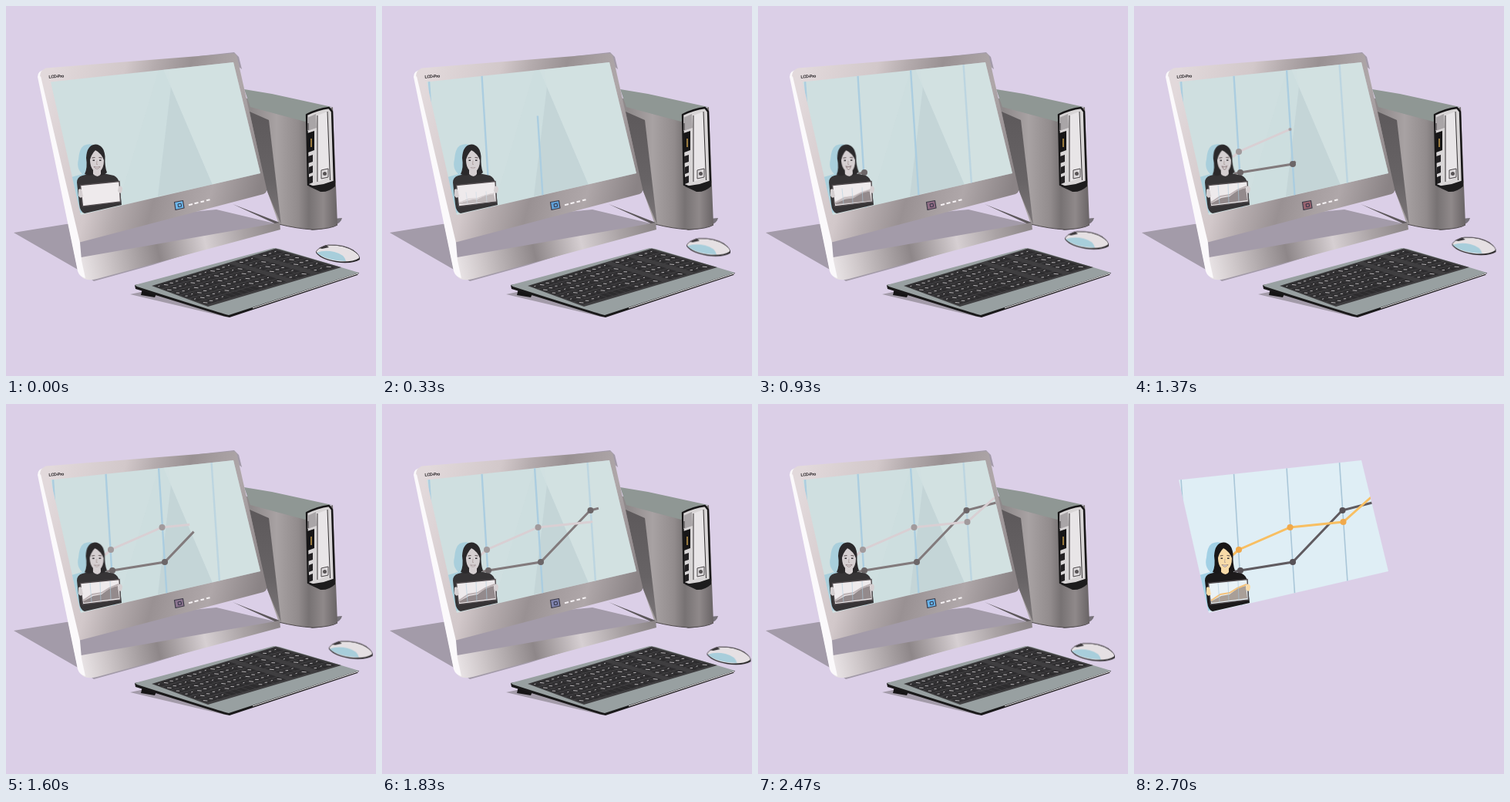
Animation of 480x480 px, one loop 2730 ms. Source, as an HTML page:

```html
<!DOCTYPE html>
<html lang="en">
<head>
<meta charset="utf-8">
<title>Presentation on a desktop computer</title>
<style>
html, body { margin: 0; width: 100%; height: 100%; overflow: hidden; background: #dbcfe7; }
svg { display: block; width: 100%; height: 100%; }
svg * { animation-duration: 2730ms; animation-timing-function: linear; animation-iteration-count: infinite; }

/* The last 30 ms show only the screen, in full colour. */
#scene { animation-name: palette; animation-timing-function: step-end; }
@keyframes palette {
  0% { --screen: #cfdfe0; --grid: #abcde0; --gridW: 2.4; --far: .55; --warm: #d9cfd3; --warmDot: #a19a9c;
       --cool: #827a7c; --coolDot: #6c6668; --skin: #d5cfd1; --hair: #2b292b; --suit: #363436; --back: #a9cfdc;
       --paper: #eeeaec; --area: #938a8c; --crest: #bdb3b5; }
  98.9%, 100% { --screen: #dfeef5; --grid: #a9c6d8; --gridW: 1.6; --far: 1; --warm: #f8bf62; --warmDot: #f0a94b;
       --cool: #605b60; --coolDot: #575257; --skin: #f8dba8; --hair: #191718; --suit: #1c1a1b; --back: #a2d0e5;
       --paper: #e9f2f6; --area: #a99f98; --crest: #f5c27a; }
}
.gear { animation-name: vanish; animation-timing-function: step-end; }
@keyframes vanish { 0% { visibility: visible; } 98.9%, 100% { visibility: hidden; } }

.draw { fill: none; stroke-dasharray: 1 2; }
.grid { stroke: var(--grid); stroke-width: var(--gridW); }
.cool { stroke: var(--cool); stroke-width: 3; animation-name: cool; }
.warm { stroke: var(--warm); stroke-width: 3; animation-name: warm; }
@keyframes cool { 0%, 33% { stroke-dashoffset: 1; } 34% { stroke-dashoffset: .96; } 49.5% { stroke-dashoffset: .63; }
  67% { stroke-dashoffset: .14; } 72%, 100% { stroke-dashoffset: 0; } }
@keyframes warm { 0%, 34.5% { stroke-dashoffset: 1; } 50.2% { stroke-dashoffset: .585; }
  67% { stroke-dashoffset: .235; } 78%, 100% { stroke-dashoffset: 0; } }
#g1 { animation-name: g1; } #g2 { animation-name: g2; } #g3 { animation-name: g3; }
#g4 { animation-name: g4; opacity: var(--far); }
@keyframes g1 { 0% { stroke-dashoffset: 1; } 3.7%, 100% { stroke-dashoffset: 0; } }
@keyframes g2 { 0%, 3% { stroke-dashoffset: 1; } 9.2%, 100% { stroke-dashoffset: 0; } }
@keyframes g3 { 0%, 8.4% { stroke-dashoffset: 1; } 14.3%, 100% { stroke-dashoffset: 0; } }
@keyframes g4 { 0%, 14.3% { stroke-dashoffset: 1; } 20.1%, 100% { stroke-dashoffset: 0; } }

.dot { transform-box: fill-box; transform-origin: center; }
.coolDot { fill: var(--coolDot); } .warmDot { fill: var(--warmDot); }
#c1 { animation-name: c1; } #c2 { animation-name: c2; } #c3 { animation-name: c3; }
#w1 { animation-name: w1; } #w2 { animation-name: w2; } #w3 { animation-name: w3; }
@keyframes c1 { 0%, 31.5% { transform: scale(0); } 34%, 100% { transform: none; } }
@keyframes c2 { 0%, 47% { transform: scale(0); } 50%, 100% { transform: none; } }
@keyframes c3 { 0%, 63% { transform: scale(0); } 66%, 100% { transform: none; } }
@keyframes w1 { 0%, 34.5% { transform: scale(0); } 37.5%, 100% { transform: none; } }
@keyframes w2 { 0%, 48.5% { transform: scale(0); } 52%, 100% { transform: none; } }
@keyframes w3 { 0%, 67.2% { transform: scale(0); } 70.5%, 100% { transform: none; } }

#mouse { animation-name: glide; }
@keyframes glide {
  0%, 100% { transform: none; }
  6% { transform: translate(-4px, -4px); }
  12.1% { transform: translate(-7px, -8.5px); }
  20% { transform: translate(-8.5px, -14px); }
  27% { transform: translate(-7.5px, -17px); }
  34.1% { transform: translate(-4px, -17.5px); }
  42% { transform: translate(3px, -15.5px); }
  50.2% { transform: translate(10.5px, -10px); }
  59% { transform: translate(17px, -2px); }
  67% { transform: translate(19.5px, 5px); }
  74% { transform: translate(17px, 6px); }
  82% { transform: translate(10px, 3.5px); }
  90.5% { transform: translate(4px, .5px); }
}
#power { animation-name: power; }
@keyframes power { 0%, 100% { fill: #6db7ea; } 12% { fill: #609fd6; } 34% { fill: #8f6c84; }
  50% { fill: #99646f; } 67% { fill: #7f83ad; } 90% { fill: #65b2e9; } }

#head { transform-origin: 118px 220px; animation-name: nod; }
@keyframes nod { 0%, 14%, 64%, 100% { transform: none; } 34%, 50% { transform: rotate(-3deg); } }
#mouth { transform-origin: 118px 210px; animation-name: talk; }
@keyframes talk { 0%, 24%, 44%, 62%, 80%, 100% { transform: none; } 12%, 56%, 72% { transform: scale(.75, .6); }
  34%, 50% { transform: scale(.8, 1.5); } }
#area { transform-origin: 124px 256px; animation-name: rise; }
@keyframes rise { 0% { transform: scaleY(0); opacity: 0; } 12% { transform: scaleY(.6); opacity: .5; }
  34% { transform: scaleY(.8); opacity: 1; } 50%, 100% { transform: none; opacity: 1; } }
</style>
</head>
<body>
<svg viewBox="0 0 480 480">
<defs>
  <clipPath id="glass"><path d="M58 98.500L295 73L330 217L97 271Z"/></clipPath>
  <linearGradient id="bezel" gradientUnits="userSpaceOnUse" x1="50" y1="120" x2="340" y2="199">
    <stop offset="0" stop-color="#e2d9db"/><stop offset=".3" stop-color="#d2c8ca"/>
    <stop offset=".42" stop-color="#b5acae"/><stop offset=".57" stop-color="#999193"/>
    <stop offset=".68" stop-color="#a59d9f"/><stop offset=".8" stop-color="#afa7a9"/>
    <stop offset="1" stop-color="#8a8385"/>
  </linearGradient>
  <linearGradient id="bar" gradientUnits="userSpaceOnUse" x1="93" y1="345" x2="356" y2="286">
    <stop offset="0" stop-color="#eee9eb"/><stop offset=".14" stop-color="#cfc8ca"/>
    <stop offset=".4" stop-color="#8e8789"/><stop offset=".63" stop-color="#d6cfd2"/>
    <stop offset=".82" stop-color="#aaa3a5"/><stop offset="1" stop-color="#8b8587"/>
  </linearGradient>
  <linearGradient id="side" gradientUnits="userSpaceOnUse" x1="318" y1="0" x2="435" y2="0">
    <stop offset="0" stop-color="#8e898a"/><stop offset=".28" stop-color="#a8a2a3"/>
    <stop offset=".52" stop-color="#928c8d"/><stop offset=".64" stop-color="#777273"/>
    <stop offset=".8" stop-color="#8f898a"/><stop offset="1" stop-color="#5e595b"/>
  </linearGradient>
  <linearGradient id="back" x1="0" y1="0" x2="0" y2="1">
    <stop offset="0" stop-color="#5d595b"/><stop offset=".6" stop-color="#676365"/><stop offset="1" stop-color="#7c7779"/>
  </linearGradient>
</defs>

<g id="scene">
  <g class="gear">
    <path fill="#a39ba9" d="M10 294L78 283L273 264L357 284L190 336L114 357L95 343Z"/>
    <path fill="#a39ba9" d="M250 65L296 60L302 66L306 82L290 70Z"/>

    <!-- Tower -->
    <path fill="#77727a" d="M395 290L425 276L436 275Q434 287 397 291Z"/>
    <path fill="url(#side)" d="M310 119L388 145L424 131L430 284Q416 290 397 290Q372 288 354 283L330 215Z"/>
    <path fill="#8f9794" d="M309 108L345 114L423 131Q403 133 388 150L317 131Z"/>
    <path fill="url(#back)" d="M316 137L341 148L357 284L337 236Z"/>
    <path fill="#5d585b" d="M294 257L355 281V285Z"/>
    <path fill="none" stroke="#4e494b" d="M354 283Q378 289 398 290Q422 289 430 284"/>
    <path fill="#d8d5d6" stroke="#171617" stroke-width="2.400" stroke-linejoin="round" d="M390 141Q404 134 419 132L423 137L426 229Q420 239 410 239L392 232Z"/>
    <path fill="#1d1c1d" d="M393 234L412 231L427 226L427 234Q418 242 408 241Z"/>
    <path fill="#e8e5e7" d="M404 142L417 137L420 222L404 228Z"/>
    <path fill="#a9a5a7" d="M391 145L402 140L403 158L391 162Z"/>
    <path fill="none" stroke="#343133" d="M404 142V228M417 137L420.500 226M392 152V161"/>
    <path fill="#171617" d="M391 165L400 162V187L392 190Z"/>
    <path stroke="#9a7b3f" stroke-width="2" d="M396 172V183"/>
    <path fill="#232123" d="M392 195L398 193V202L392 204ZM393 209L398 207V216L393 218ZM393 222L398 220V229L393 231Z"/>
    <path fill="#dedbdd" stroke="#4a4648" d="M409 213L418 211V222L409 224Z"/>
    <circle cx="413.500" cy="217.500" r="2.500" fill="#575355"/>

    <!-- Monitor -->
    <path fill="#fbf9fb" d="M41 92Q41 84 50 83L100 352Q95 350 93 344Z"/>
    <path fill="url(#bezel)" d="M44 92Q44 83 52 80.500L294 61.500Q299 61 300 67L338 237Q339 242 334 244L94 307Z"/>
    <path fill="url(#bar)" d="M92 327L355 281L356 290L118 354Q101 358 97 349Z"/>
    <path fill="#fbf9fb" d="M42 93L45 91L96 307L98 330L103 353Q96 352 93 342Z"/>
    <text x="55.500" y="93.700" transform="rotate(-3 55 93)" font-family="'Liberation Sans', Arial, sans-serif" font-size="5.500" font-weight="700" letter-spacing="-.4" fill="#201d20">LCD-Pro</text>
    <path id="power" stroke="#3d3b48" stroke-width="1.200" stroke-linejoin="round" d="M218.500 254.500L229.500 252.500L231 262L220 264.500Z"/>
    <path fill="none" stroke="#333448" d="M223 257L227 256.200L227.700 260L223.700 260.800Z"/>
    <path stroke="#f6f2f4" stroke-width="2" d="M237 258.200L242 257M244.500 256.200L249.500 255M252.500 254.300L257 253.200M260 252.300L264.500 251.200"/>
  </g>

  <!-- Screen -->
  <g clip-path="url(#glass)">
    <rect x="50" y="65" width="290" height="215" style="fill: var(--screen)"/>
    <g class="gear">
      <path fill="#c5d9db" d="M198 83L210 83L214 105L197 247L145 260Z" opacity=".25"/>
      <path fill="#b9cccf" d="M214 105L268 232L197 247Z" opacity=".5"/>
      <path fill="#d6e4e4" d="M204 82L298 72L331 218L268 232Z" opacity=".5"/>
    </g>
    <path id="g1" class="draw grid" pathLength="1" d="M71 250L61 97"/>
    <path id="g2" class="draw grid" pathLength="1" d="M140 262L129.500 90"/>
    <path id="g3" class="draw grid" pathLength="1" d="M208.500 246L198 82"/>
    <path id="g4" class="draw grid" pathLength="1" d="M277 231L266.500 75"/>
    <path class="draw cool" pathLength="1" d="M130 217.500L138 216L206 205L270 138L309 128"/>
    <path class="draw warm" pathLength="1" d="M128 196L136 189L202.500 160L271.500 153L308 120.500"/>
    <g class="coolDot">
      <circle id="c1" class="dot" cx="138" cy="216" r="4"/>
      <circle id="c2" class="dot" cx="206" cy="205" r="4"/>
      <circle id="c3" class="dot" cx="270.500" cy="138" r="4"/>
    </g>
    <g class="warmDot">
      <circle id="w1" class="dot" cx="136" cy="189" r="4"/>
      <circle id="w2" class="dot" cx="202.500" cy="160" r="4"/>
      <circle id="w3" class="dot" cx="271.500" cy="153" r="4"/>
    </g>

    <!-- Presenter -->
    <path style="fill: var(--back)" d="M101 181Q112 176 118 185L112 222L101 267L95 269L85 222L99 218Q91 211 94 199Q95 185 101 181Z"/>
    <path style="fill: var(--suit)" d="M92 229Q92 222 99 220L111 217H126L140 220Q146 223 147 230L150 258L102 269Q96 267 95 257Z"/>
    <g id="head">
      <path style="fill: var(--hair)" d="M102 218Q106 210 104 197Q105 180 116 179.500Q127 180 128.500 195Q128 209 131 216Q126 221 121 219H112Q107 221 102 218Z"/>
      <path style="fill: var(--skin)" d="M113 211H123V218Q119 224 113 218Z"/>
      <path style="fill: var(--skin)" d="M109 200Q109 189 116 187Q126 189 127 200Q127 210 122 214.500Q118 217 114 214Q109 209 109 200Z"/>
      <path style="fill: var(--hair)" d="M108 203Q106 186 115 183Q126 183 128 202Q124 191 116 187Q110 193 108 203Z"/>
      <path fill="none" stroke="#4b4041" stroke-width=".9" d="M111.500 197L115.500 196.500M120.500 196.500L124.500 197"/>
      <path fill="#353236" d="M112.500 199.500h2.500v1.500h-2.500zM121 199.500h2.500v1.500h-2.500z"/>
      <path fill="none" stroke="#a39391" stroke-width=".7" d="M118 201L117.500 205.500H119"/>
      <path id="mouth" fill="#faf7f7" stroke="#796567" stroke-width=".7" d="M114 208.500Q118 210 122 208.500Q118 214 114 208.500Z"/>
    </g>
    <path style="fill: var(--paper)" stroke="#514b4e" stroke-width="1.400" d="M96.500 232.500L147 227.500L148.500 254L99.500 260Z"/>
    <g id="area">
      <path style="fill: var(--area)" d="M100 256L113 249L124 247L136 238L145 236L147 252L101 258Z"/>
      <path fill="none" style="stroke: var(--crest)" stroke-width="2" d="M100 255L112 247L124 245L134 239L146 234"/>
      <path fill="none" style="stroke: var(--grid)" stroke-width=".6" d="M109 232L111 257M122 231L123 256M135 230L136 254"/>
    </g>
    <path style="fill: var(--skin)" d="M94 238Q98 236 98.500 240L100 247Q96 251 94 246ZM146 234Q150 232 151 237L150 242Q147 244 145 240Z"/>
  </g>

  <g class="gear">
    <!-- Keyboard -->
    <path fill="#a39ba9" d="M161 374L180 370L260 393L288 404Z"/>
    <path fill="#161516" d="M177 367L196 371L193 378L175 375Z"/>
    <path fill="#1a191a" d="M167 362L190 358L458 346L456 349L290 404L283 402.500L168 367Z"/>
    <path fill="#98a0a1" d="M167 362L347 314L355 315L458 346L289 401Q283 400 170 364Z"/>
    <path fill="none" stroke="#e8e4e7" d="M320 392L457 347"/>
    <path fill="#3f3e40" d="M189 363L350 314.500L435 339L262 390Z"/>
    <g id="keys" fill="#2d2c2e"></g>
    <g id="glyphs" stroke="#c9c6c8" stroke-width=".9"></g>

    <!-- Mouse -->
    <g id="mouse">
      <path fill="#282628" d="M402 320Q404 313 418 310Q438 309 451 317Q460 323 459 329Q452 334 434 333Q409 330 402 320Z"/>
      <path fill="#e5e0e3" d="M402.500 318.500Q405 313 418 310.500Q437 309.500 450 317.500Q459 323 458 327Q451 332 434 331.500Q409 329 402.500 318.500Z"/>
      <path fill="#a8cedb" d="M403 320Q413 316 426 319Q439 322 441 331Q414 330 403 320Z"/>
      <path fill="#383538" d="M406 314L415 310L419 313L410 315Z"/>
      <path fill="none" stroke="#575256" stroke-width=".8" d="M402 319Q405 313 418 310Q438 309 451 317"/>
    </g>
  </g>
</g>
</svg>
<script>
const SVG = 'http://www.w3.org/2000/svg';
const corners = [[192, 363], [350, 316], [431, 339], [262, 388]];
const mix = (a, b, k) => a + (b - a) * k;

// Point on the key bed: u runs along the rows, v towards the front.
function bed(u, v) {
  const at = i => mix(mix(corners[0][i], corners[1][i], u), mix(corners[3][i], corners[2][i], u), v);
  return at(0).toFixed(1) + ' ' + at(1).toFixed(1);
}

function addPath(id, d) {
  const path = document.createElementNS(SVG, 'path');
  path.setAttribute('d', d);
  document.getElementById(id).append(path);
}

const columns = 21, rows = 6;
const isGap = col => col === 13 || col === 17;
let keys = '', glyphs = '';
for (let row = 0; row < rows; row++) {
  for (let col = 0; col < columns; col++) {
    if (isGap(col)) continue;
    const u = col / columns, v = row / rows;
    const right = u + .86 / columns, front = v + .84 / rows;
    keys += `M${bed(u, v)}L${bed(right, v)}L${bed(right, front)}L${bed(u, front)}Z`;
    const isSpaceBar = row === rows - 1 && col > 3 && col < 9;
    if (isSpaceBar) continue;
    const gu = u + .25 / columns, gv = v + .3 / rows;
    const slant = (col * 7 + row * 3) % 4 * .1 / rows;
    glyphs += `M${bed(gu, gv)}L${bed(gu + .26 / columns, gv + slant)}`;
  }
}
addPath('keys', keys);
addPath('glyphs', glyphs);
</script>
</body>
</html>
```
